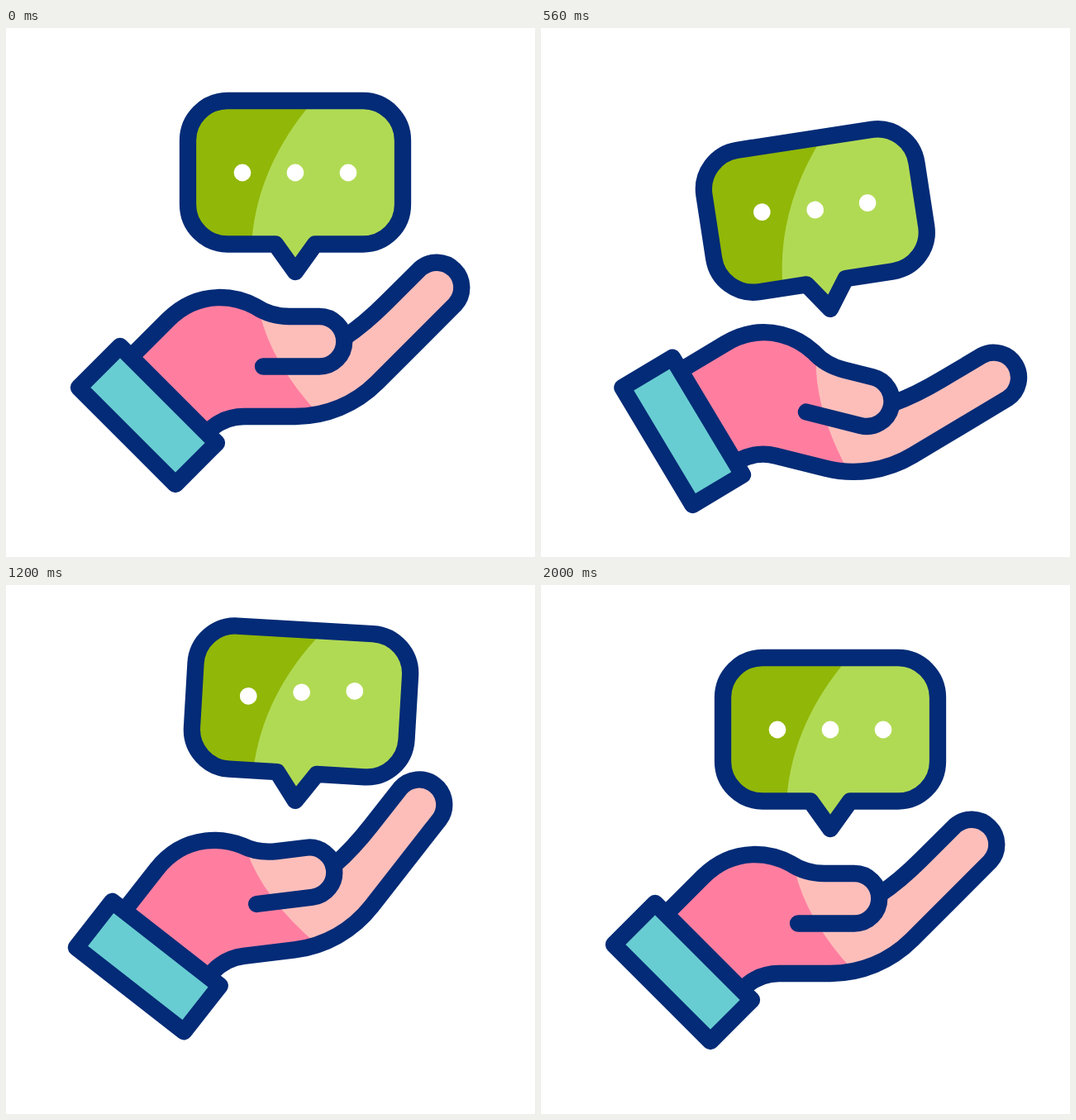
Animation, 640 px wide and 640 px high, one loop 2080 ms. Source, as an HTML page:

```html
<!DOCTYPE html>
<html lang="en">
<head>
<meta charset="utf-8">
<title>Hand and speech bubble</title>
<style>
  html, body { margin: 0; width: 100%; height: 100%; overflow: hidden; background: #fff; }
  svg { display: block; width: 100%; height: 100%; }
  .line { fill: none; stroke: #032b77; stroke-width: 20.3; stroke-linecap: round; stroke-linejoin: round; }
</style>
</head>
<body>
<svg viewBox="0 0 640 640">
  <defs>
    <path id="bubbleShape" d="M268 88H432A48 48 0 0 1 480 136V213.5A48 48 0 0 1 432 261.5H374L350 295L326 261.5H268A48 48 0 0 1 220 213.5V136A48 48 0 0 1 268 88Z"/>
    <path id="handShape" d="M158 391L196 353C213 336 235 326 259 326C274 326 289 330 302 337C314 345 328 349 343 349H379A30 30 0 0 1 409 374Q434 358 460 332L500.6 291.6A30.3 30.3 0 0 1 543.4 334.4L448.7 429.1A139.6 139.6 0 0 1 350 470H288C273 470 260 475 249 484Z"/>
    <clipPath id="bubbleClip"><use href="#bubbleShape"/></clipPath>
    <clipPath id="handClip"><use href="#handShape"/></clipPath>
  </defs>

  <g id="hand">
    <use href="#handShape" fill="#ff7ea0"/>
    <path clip-path="url(#handClip)" fill="#fdbeba" d="M307 345Q321 405 377 466L380 490H600V250H307Z"/>
    <path class="line" d="M158 391L196 353C213 336 235 326 259 326C274 326 289 330 302 337C314 345 328 349 343 349H379A30.25 30.25 0 0 1 379 409.5H311"/>
    <path class="line" d="M410 374Q434 358 460 332L500.6 291.6A30.3 30.3 0 0 1 543.4 334.4L448.7 429.1A139.6 139.6 0 0 1 350 470H288C273 470 260 475 249 484"/>
    <path class="line" style="fill:#68cdd2" d="M138 385L88 435L205 552L255 502Z"/>
  </g>

  <g id="bubble">
    <use href="#bubbleShape" fill="#b1da54"/>
    <path clip-path="url(#bubbleClip)" fill="#91b708" d="M210 80H379L372 88Q303 168 297 262H210Z"/>
    <use href="#bubbleShape" class="line"/>
    <g fill="#fff">
      <circle class="dot" cx="286" cy="175" r="10.4"/>
      <circle class="dot" cx="350" cy="175" r="10.4"/>
      <circle class="dot" cx="414" cy="175" r="10.4"/>
    </g>
  </g>
</svg>
<script>
  const LOOP = 2080, TICK = 40, DOT_LAG = 160, EASE_POWER = 1.75;

  // Turning points of each motion as [time, value].
  const handTurn = [[70, 0], [698, 15.6], [1353, -9.8], [1885, 0]];
  const bubbleDrop = [[192, 0], [750, 59], [1440, -65], [1984, 0]];
  const bubbleTurn = [[200, 0], [490, -9.2], [1030, 5.3], [1510, -2.25], [2000, 0]];
  const dotHop = [[300, 0], [825, -17], [1360, 0]];

  const hand = document.getElementById("hand");
  const bubble = document.getElementById("bubble");
  const dots = document.querySelectorAll(".dot");
  const clamp = (v, lo, hi) => Math.min(hi, Math.max(lo, v));

  function easeInOut(p) {
    const rise = p ** EASE_POWER, rest = (1 - p) ** EASE_POWER;
    return rise / (rise + rest);
  }

  // Adds up one eased move per pair of neighbouring turning points.
  function valueAt(keys, time) {
    let value = keys[0][1];
    for (let i = 1; i < keys.length; i++) {
      const [start, from] = keys[i - 1], [end, to] = keys[i];
      value += (to - from) * easeInOut(clamp((time - start) / (end - start), 0, 1));
    }
    return value;
  }

  function draw(time) {
    const turn = valueAt(handTurn, time);
    const lean = clamp(turn / 8, -1, 1); // the wrist pivot slides a little with the turn
    hand.setAttribute("transform",
      `rotate(${turn} ${104.5 - 11.5 * lean} ${469 + 8 * lean})`);

    bubble.setAttribute("transform",
      `translate(0 ${valueAt(bubbleDrop, time)}) rotate(${valueAt(bubbleTurn, time)} 350 295)`);

    dots.forEach((dot, i) =>
      dot.setAttribute("cy", 175 + valueAt(dotHop, time - i * DOT_LAG)));
  }

  function frame() {
    const time = performance.now() % LOOP;
    draw(Math.floor(time / TICK) * TICK);
    requestAnimationFrame(frame);
  }
  frame();
</script>
</body>
</html>
```
